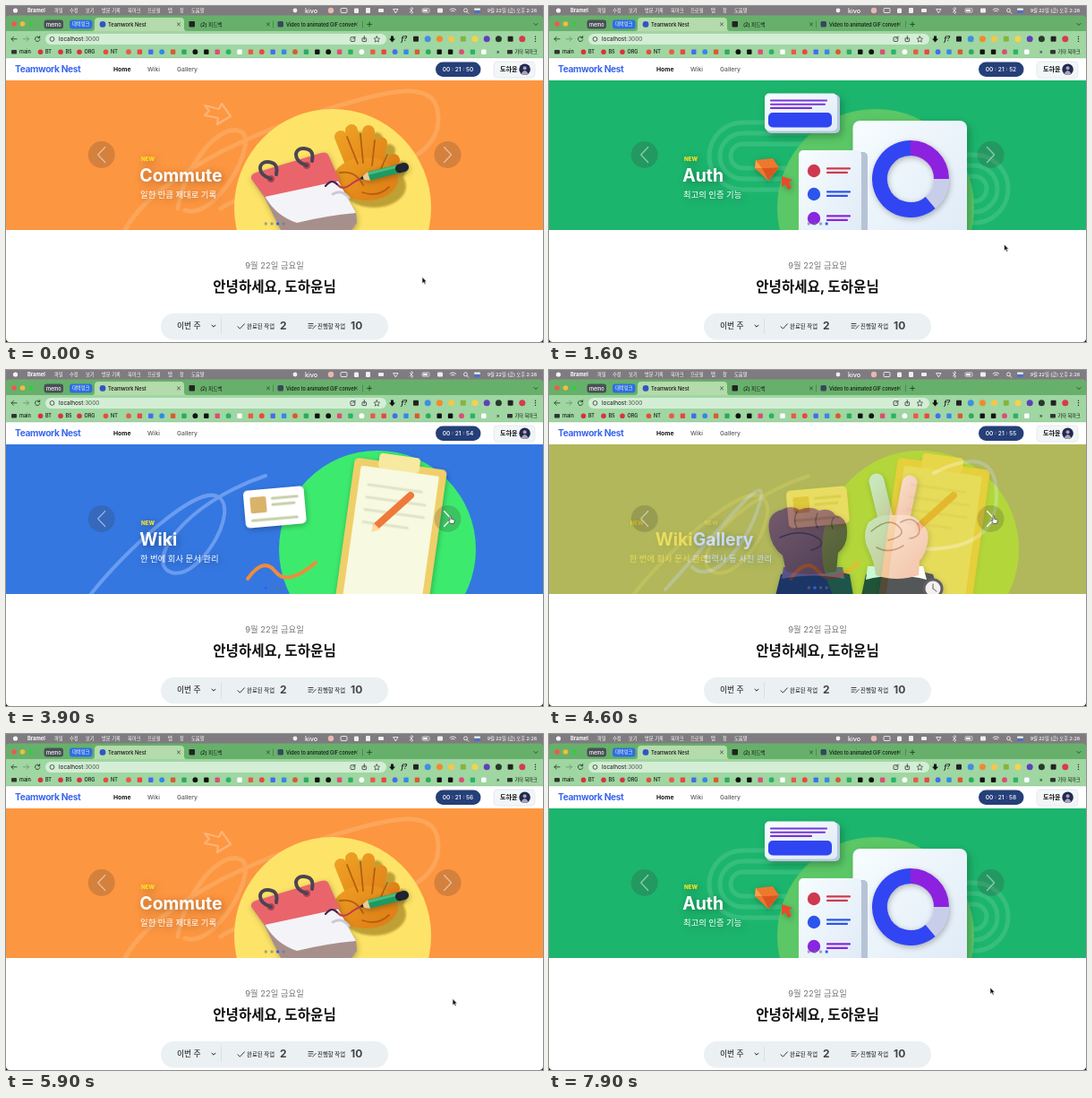
These frames come from a looping animation (600x375 px, 8000 ms). An HTML page:

```html
<!DOCTYPE html>
<html lang="ko">
<head>
<meta charset="utf-8">
<style>
html, body { margin: 0; width: 100%; height: 100%; overflow: hidden; background: #222; }
svg { display: block; width: 100vw; height: 100vh; }
text { font-family: Inter, "Noto Sans CJK KR", "Noto Sans CJK", sans-serif; white-space: pre; }
.near, .far { filter: drop-shadow(2px 2px 4px rgba(0,0,0,.35)); }
.soft { filter: drop-shadow(1px 2px 3px rgba(0,0,0,.28)); }
.deep { filter: drop-shadow(3px 4px 4px rgba(0,40,20,.3)); }
.cast { filter: drop-shadow(9px 8px 1px rgba(150,115,20,.6)); }
</style>
</head>
<body>
<svg id="stage" viewBox="0 0 600 375">
  <defs>
    <clipPath id="banner"><rect y="83" width="600" height="167"/></clipPath>
    <linearGradient id="palm" x1="0" y1="0" x2="1" y2="1">
      <stop stop-color="#eda024"/><stop offset="1" stop-color="#dd7a14"/>
    </linearGradient>
    <linearGradient id="skin" x1="0" y1="0" x2="1" y2="1">
      <stop stop-color="#ffe6d8"/><stop offset="1" stop-color="#f0ad90"/>
    </linearGradient>
    <linearGradient id="dark" x1="0" y1="0" x2="1" y2="1">
      <stop stop-color="#8f5142"/><stop offset="1" stop-color="#54261f"/>
    </linearGradient>
    <linearGradient id="paper" x1="0" y1="0" x2="1" y2="1">
      <stop stop-color="#f7fdff"/><stop offset="1" stop-color="#dfeaf6"/>
    </linearGradient>
  </defs>
  <g id="page"></g>
  <g id="slides" clip-path="url(#banner)"></g>
  <g id="controls"></g>
  <g id="pointer"></g>
</svg>
<script>
const $ = id => document.getElementById(id);
const rect = (x, y, w, h, fill, r = 0, more = '') =>
  `<rect x="${x}" y="${y}" width="${w}" height="${h}" rx="${r}" fill="${fill}" ${more}/>`;
const dot = (x, y, r, fill, more = '') => `<circle cx="${x}" cy="${y}" r="${r}" fill="${fill}" ${more}/>`;
const shape = (d, fill, more = '') => `<path d="${d}" fill="${fill}" ${more}/>`;
const line = (d, color, w = 1, more = '') =>
  `<path d="${d}" fill="none" stroke="${color}" stroke-width="${w}" stroke-linecap="round" stroke-linejoin="round" ${more}/>`;
const label = (x, y, s, size, weight = 400, fill = '#111', more = '') =>
  `<text x="${x}" y="${y}" font-size="${size}" font-weight="${weight}" fill="${fill}" ${more}>${s}</text>`;
const cross = (x, y) => line(`M${x - 1.6} ${y - 1.6}l3.2 3.2m0 -3.2l-3.2 3.2`, '#1d3520', .7);

function menuBar() {
  const items = [[54, '파일'], [71, '수정'], [89, '보기'], [107, '방문 기록'], [136, '북마크'],
    [158, '프로필'], [181, '탭'], [194, '창'], [207, '도움말']];
  let s = rect(0, 0, 600, 16, '#7f7b80') + dot(10.5, 5, 2.6, '#f4f4f4') +
    label(24, 7.2, 'Bramel', 5.8, 700, '#fff');
  for (const [x, t] of items) s += label(x, 7.1, t, 5.3, 500, '#fff');
  s += dot(323, 5, 2.4, '#eee') + label(334, 7.6, 'kivo', 7.2, 500, '#fff') + dot(363, 5, 3.2, '#e8b8b0');
  s += rect(374, 2.5, 7, 5, 'none', 1, 'stroke="#fff" stroke-width=".8"');
  s += rect(389, 2.5, 5, 5.5, '#eee', 1) + rect(402, 2, 5, 6, '#eee', 1) + rect(416, 3, 6, 4, '#eee', 1);
  s += line('M433 3.5h5l-2.5 4z', '#fff', .8) + line('M451 3l4 4l-2 1.5v-7l2 1.5l-4 4', '#fff', .6);
  s += rect(465, 2.8, 8, 4.4, 'none', 1, 'stroke="#eee" stroke-width=".7"') + rect(466, 3.8, 5, 2.4, '#eee');
  s += rect(482, 2.5, 6, 5, '#eee', 1) + line('M496 4.2q3.3 -2.8 6.6 0M497.6 5.8q1.7 -1.3 3.4 0', '#fff', .9);
  s += line('M515 6.5l1.8 1.8', '#fff', .8) + dot(513.5, 4.8, 2, 'none', 'stroke="#fff" stroke-width=".8"');
  s += rect(523, 2.5, 7, 2.3, '#eee', 1.1) + rect(523, 5.5, 7, 2.3, '#3674d8', 1.1);
  return s + label(593, 7.2, '9월 22일 (금) 오후 2:28', 5.3, 500, '#fff', 'text-anchor="end"');
}

function browser() {
  let s = rect(0, 10.5, 600, 30, '#67b06b', 4) + rect(0, 28, 600, 30, '#9fd6a2');
  ['#f0574f', '#f3bd35', '#3cc84a'].forEach((c, i) => s += dot(9 + i * 9.5, 20, 2.8, c));
  s += rect(42.5, 15.5, 21.5, 10, '#494f55', 3) + label(53.3, 22.5, 'memo', 5.6, 500, '#fff', 'text-anchor="middle"');
  s += rect(71, 15.5, 25.5, 10, '#2d6ee0', 3) + label(83.7, 22.4, '대박링크', 5.3, 500, '#fff', 'text-anchor="middle"');
  s += shape('M96 28q3 0 3 -3v-8q0 -4 4 -4h92q4 0 4 4v8q0 3 3 3z', '#b4dbab');
  s += dot(108, 20.4, 3.4, '#3154c8') + label(114, 22.5, 'Teamwork Nest', 5.7, 500);
  s += rect(204.5, 17, 6.5, 6.5, '#222', 1) + label(217, 22.5, '(2) 피드백', 5.6, 500);
  s += rect(303.5, 17, 6.5, 6.5, '#35485c', 1.5) + label(313, 22.5, 'Video to animated GIF conver', 5.5, 500);
  s += cross(193, 20.4) + cross(293, 20.4) + cross(391, 20.4);
  s += line('M298.5 17v7M398.5 17v7', '#407b45', .7) + line('M403.6 20.4h5M406.1 17.9v5', '#173b1b', .8);
  s += line('M590 19.5l2 2l2 -2', '#173b1b', .8);
  // address row
  s += line('M12 36.8h-6m2.4 -2.4l-2.4 2.4l2.4 2.4', '#28422b', .9);
  s += line('M19.5 36.8h6m-2.4 -2.4l2.4 2.4l-2.4 2.4', '#6b9a70', .9);
  s += line('M37.6 35.6a2.7 2.7 0 1 0 .2 2m-.1 -4v2h-2', '#28422b', .9);
  s += rect(44, 31, 381, 12, '#d3eed5', 6) + dot(51.5, 36.9, 2.4, 'none', 'stroke="#333" stroke-width=".8"');
  s += label(59, 39.2, 'localhost<tspan fill="#4b5b4c">:3000</tspan>', 6.4);
  s += rect(385, 34.7, 4.8, 4.8, 'none', .8, 'stroke="#333" stroke-width=".8"') + line('M387.5 37l3 -3', '#333', .8);
  s += rect(398, 35.8, 4.6, 3.8, 'none', .6, 'stroke="#333" stroke-width=".8"') + line('M400.3 37.5v-4', '#333', .8);
  s += line('M414.3 33.8l1 2.1l2.2 .3l-1.6 1.6l.4 2.3l-2 -1.1l-2 1.1l.4 -2.3l-1.6 -1.6l2.2 -.3z', '#333', .7);
  s += shape('M430 33.5h3v3h2l-3.5 4l-3.5 -4h2z', '#111') + label(441.5, 39.4, 'f?', 7, 700, '#222', 'font-style="italic"');
  const add = ['#222', '#3f8fe0', '#f08b2b', '#f1c84b', '#87b340', '#f4d34a', '#6040b8', '#273b29', '#222', '#d83a4e'];
  add.forEach((c, i) => s += i % 4 ? dot(458 + i * 13.2, 36.8, 3.5, c) : rect(455 + i * 13.2, 33.8, 6, 6, c, 1));
  [34.2, 36.8, 39.4].forEach(y => s += dot(591.5, y, .7, '#222'));
  // bookmarks row
  s += rect(6, 49, 6, 4.6, '#333', 1);
  [[15, 'main'], [44, 'BT'], [66.5, 'BS'], [87.5, 'ORG'], [117, 'NT']].forEach(([x, t], i) => {
    s += label(x, 53.3, t, 5.5, 500);
    if (i) s += dot(x - 5.5, 51.2, 2.8, i == 4 ? '#e84b3d' : '#db3040');
  });
  const hues = ['#ea5a45', '#db4d76', '#2daa62', '#446cf0', '#fff', '#111', '#d85b30', '#e44', '#2ab366', '#111', '#3688e8'];
  for (let i = 0; i < 33; i++) {
    const x = 137 + i * 12.4, c = hues[i * 7 % 11];
    s += i % 3 ? rect(x - 2.7, 48.5, 5.4, 5.4, c, 1) : dot(x, 51.2, 2.9, c);
  }
  return s + label(548, 53, '»', 6) + rect(560, 49, 6, 4.6, '#333', 1) + label(568.5, 53.2, '기타 북마크', 5.2, 500);
}

function site() {
  let s = rect(0, 58, 600, 317, '#fff', 0) + rect(0, 57.6, 600, .6, '#8fbb92');
  s += label(10, 74.4, 'Teamwork Nest', 10.2, 700, '#3a66ee', 'letter-spacing="-.35"');
  s += label(120, 73.2, 'Home', 6.8, 700) + label(158, 73.2, 'Wiki', 6.8, 500, '#5b5b5b') + label(191, 73.2, 'Gallery', 6.8, 500, '#5b5b5b');
  s += rect(480, 62.5, 50.5, 16.4, '#253f78', 8.2);
  s += label(505, 73, '', 6.6, 500, '#fff', 'id="clock" text-anchor="middle"');
  s += rect(545, 62, 46, 18, '#f2f6f8', 4, 'stroke="#dfe6ea" stroke-width=".7"') + label(552, 73.4, '도하윤', 7.1, 700);
  s += dot(579.6, 70.8, 6.3, '#222850') + dot(579.6, 69.2, 2, '#a9a4b5') + shape('M575.6 75.4q4 -7 8 0q-4 3 -8 0z', '#a9a4b5');
  s += label(300, 293.4, '9월 22일 금요일', 9.4, 400, '#777', 'text-anchor="middle"');
  s += label(300, 319, '안녕하세요, 도하윤님', 15.6, 700, '#111', 'text-anchor="middle"');
  s += rect(173, 343, 254, 29.5, '#ebf1f3', 14.7) + label(191, 360.4, '이번 주', 8.8, 500);
  s += line('M230 356.2l2 2l2 -2', '#222', 1) + line('M240.5 349v17', '#d3dadd', .7);
  s += line('M259 357.8l2.4 2.4l5 -5.4', '#333', 1) + label(269, 360, '완료된 작업', 6.4, 500) + label(306, 361.4, '2', 12, 700, '#444');
  s += line('M338 354.5h5m-5 2.4h5m-5 2.4h3m1.6 1l3.6 -3.8', '#333', .9) + label(348, 360, '진행할 작업', 6.4, 500) + label(385, 361.4, '10', 12, 700, '#444');
  return s + shape('M0 371v4h4q-4 0 -4 -4zM600 371v4h-4q4 0 4 -4z', '#111');
}

const halo = c => dot(365, 225, 110, c);
const bars = (x, y, w, c) => line(`M${x} ${y}h${w}M${x} ${y + 4.5}h${w - 3}`, c, 2.2);

function wikiArt() {
  let s = dot(415, 200, 110, '#3ceb6e');
  s += line('M95 250C130 205 215 125 238 142S215 235 185 226S195 150 290 118', '#6b9cf0', 4);
  s += `<g class="soft" transform="rotate(8 432 165)">` + rect(381, 104, 104, 170, '#f0cf6a', 5) + rect(389, 112, 88, 160, '#f7fae0', 2) +
    rect(408, 95, 46, 17, '#f7e9a0', 4) + line('M400 132h60m-60 14h66m-66 14h66m-66 14h50', '#dfe4c8', 3) + '</g>';
  s += `<g class="soft" transform="rotate(-5 300 150)">` + rect(266, 132, 68, 42, '#fff', 5) + rect(273, 140, 18, 18, '#d9b36a', 2) +
    line('M298 143h28m-28 7h24m-48 16h50', '#c5cfa8', 3) + '</g>';
  s += line('M270 233q18 -25 31 -8t45 -10', '#ef8b3b', 4) + line('M414 174l38 -34', '#ef793b', 8) + shape('M408 181l3 -10l7 7z', '#ffd9a0');
  return s;
}

function galleryArt() {
  let s = line('M130 245C190 180 250 100 235 150S180 240 160 220M430 115q70 -35 70 25t-80 60', '#ecdf70', 4);
  s += `<g class="soft">` + shape('M253 252l6 -24q38 -9 77 0l4 24z', '#141d3a') + shape('M262 220h66l2 13q-34 -7 -70 0z', '#6a4468');
  s += shape('M246 180q-3 -20 14 -24q10 -6 20 0q12 -5 22 1q12 -4 18 5q14 3 13 20q0 14 -10 22l-2 21q-30 6 -56 0l-4 -18q-13 -10 -15 -27z', 'url(#dark)');
  s += line('M277 158q-5 10 0 18M300 160q-4 9 0 16M318 165q-4 6 -1 12M258 187q24 -11 43 1q10 8 -8 13', '#3d1b18', 1.6) + '</g>';
  s += `<g class="soft">` + shape('M349 252l5 -24q36 -10 75 0l8 24z', '#181a24') + shape('M356 219h62l4 15q-34 -9 -68 0z', '#fff');
  s += line('M366 124l12 50M403 126l-10 48', 'url(#skin)', 17);
  s += shape('M357 170q12 -10 30 -8q22 -3 29 10q10 6 7 21q-3 14 -9 20l-1 16q-25 8 -48 0q-2 -16 -8 -28q-8 -16 0 -31z', 'url(#skin)');
  s += line('M360 180q20 -17 31 -5q10 10 -12 15M393 170q14 -8 20 4q4 12 -10 14M366 198q14 8 30 -2', '#c07f66', 1.6);
  return s + dot(429, 244, 10, '#f4eef4', 'stroke="#2b2540" stroke-width="3"') + line('M429 244v-5m0 5l4 3', '#2b2540', 1) + '</g>';
}

function commuteArt() {
  let s = line('M132 252C150 215 215 165 330 125S482 85 483 125S435 180 400 190M192 226C200 175 240 130 262 140S235 240 200 228M240 226q30 -20 50 -4t-30 14', '#fca65a', 5);
  s += line('M222 111l16 4l3 -6l10 14l-15 9l1 -7l-15 -3l5 -5z', '#fdb477', 2.2) + halo('#fde468');
  // open hand: four fingers fanned over a palm
  s += `<g class="cast">` + line('M374 146L390 186M386 139L397 184M405 140L405 184M419 153L412 188M433 172L420 196', 'url(#palm)', 14) +
    `<ellipse cx="402" cy="193" rx="36" ry="24" fill="url(#palm)"/></g>`;
  s += line('M381 146l12 30M396 143l3 32M412 150l-3 28M426 166l-9 20M373 186q18 -3 26 14M428 202q-12 12 -30 6', '#b55f12', 1.8);
  s += `<g class="soft">` + shape('M274 192l15 22l20 40h74l9 -12l-1 -11l-20 -34z', '#a78f8c') + shape('M289 212l82 -17l20 36q-34 3 -66 11q-24 -8 -36 -30z', '#f4f3f8');
  s += shape('M274 193q-1 -5 5 -7l73 -22q7 -2 9 4l12 27l-84 18z', '#e9656b') + '</g>';
  [[293, 185], [333, 170]].forEach(([x, y]) => s += dot(x + 3, y + 8, 4, '#b0444f') +
    line(`M${x + 3} ${y + 8}C${x - 14} ${y + 2} ${x - 11} ${y - 12} ${x} ${y - 11}S${x + 10} ${y - 2} ${x + 9} ${y + 3}`, '#4d4452', 4));
  s += line('M357 201q7 -9 13 -2t14 1t14 -8', '#c23b4c', 2) + line('M357 201q7 -9 13 -2', '#3b2858', 2) + line('M365 210q10 -6 18 4', '#c9c8d8', 3);
  s += `<g class="soft">` + line('M405 190l36 -9', '#1f9962', 10, 'style="stroke-linecap:butt"') + line('M405 187l36 -9', '#46bd7e', 3) +
    line('M440 181.3l5 -1.4', '#1f2431', 10) + shape('M395 193l9 -8l3 10z', '#ebc995') + shape('M395 193l3.5 -3.5l1.2 4.4z', '#222') + '</g>';
  return s;
}

function authArt() {
  let s = halo('#5bc766');
  const ring = (x, y, w, h) => rect(x, y, w, h, 'none', h / 2, 'stroke="#3fc284" stroke-width="5" opacity=".75"');
  for (let i = 0; i < 3; i++) {
    const d = i * 12;
    s = ring(179 + d, 130 + d, 190 - 2 * d, 75 - 2 * d) + ring(375 + d, 166 + d, 138 - 2 * d, 76 - 2 * d) + s;
  }
  s += `<g class="deep">` + rect(243, 99, 82, 43, '#b6c7dc', 5) + rect(241, 97.5, 81, 42, 'url(#paper)', 5) +
    line('M248 105.5h62m-62 4.2h60m-60 4.2h45', '#7a35d8', 2.1) + rect(245, 119, 71, 16.5, '#2f45f2', 5) + '</g>';
  s += `<g class="deep">` + rect(339.5, 128, 127.5, 135, 'url(#paper)', 8) + '</g>';
  // donut: start and end in degrees clockwise from the top
  const arc = (a, b, c) => {
    const at = g => [404 + 34.5 * Math.sin(g * Math.PI / 180), 193 - 34.5 * Math.cos(g * Math.PI / 180)].join(' ');
    return line(`M${at(a)}A34.5 34.5 0 ${b - a > 180 ? 1 : 0} 1 ${at(b)}`, c, 17, 'style="stroke-linecap:butt"');
  };
  s += `<g class="soft">` + arc(90, 142, '#c8cee9') + arc(140, 361, '#3245f3') + arc(0, 90, '#8c22df') + '</g>';
  s += rect(284, 163, 72, 100, '#b5c3d5', 5) + rect(279, 161, 70, 100, 'url(#paper)', 5);
  [['#cf3950', 184], ['#2c55ed', 210], ['#8926df', 237]].forEach(([c, y]) => s += dot(296, y, 7.2, c) + bars(311, y - 2.6, 25, c));
  s += `<g class="soft">` + shape('M231 172l19 -2l7 10l-12 15l-15 -14z', '#ed782e') + shape('M231 172l7 9l19 -1l-12 15l-7 -14l-8 0z', '#f6a04e') + shape('M238 181l19 -1l-12 15z', '#d9571f');
  return s + shape('M260 190l12 4l-4 3l3 6l-4 2l-3 -6l-4 3z', '#e84a2b') + '</g>';
}

const slides = [
  ['Wiki', '한 번에 회사 문서 관리', '#3477e1', wikiArt],
  ['Gallery', '협력사 등 사진 관리', '#e1d028', galleryArt],
  ['Commute', '일한 만큼 제대로 기록', '#fd9640', commuteArt],
  ['Auth', '최고의 인증 기능', '#1cb56d', authArt]
];

$('page').innerHTML = menuBar() + browser() + site();
$('slides').innerHTML = slides.map(([title, sub, bg, art]) => `<g>${rect(0, 83, 600, 167, bg)}${art()}
  <g class="far">${label(151, 173.2, 'NEW', 6.2, 800, '#ffe21f')}</g>
  <g class="near">${label(149.3, 196, title, 19.4, 700, '#fff')}</g>
  <g class="far">${label(150, 214.2, sub, 9.4, 500, '#fff')}</g></g>`).join('');
const cards = [...$('slides').children];

const arrow = (x, dir) => `<g>${dot(x, 166, 15, 'rgba(60,50,50,.21)')}${line(`M${x - 4 * dir} 157.5l${8 * dir} 8.5l${-8 * dir} 8.5`, '#fff', 1.2, 'opacity=".5"')}</g>`;
$('controls').innerHTML = arrow(106.7, -1) + arrow(493.5, 1) + [290.3, 297, 303.6, 310.2].map(x => dot(x, 243, 1.7, '#777', 'class="bullet"')).join('');
const bullets = [...document.querySelectorAll('.bullet')];
const nextMark = $('controls').children[1].lastChild;

$('pointer').innerHTML =
  shape('M0 0v7.2l1.7 -1.5l1.2 2.6l1.3 -.6l-1.2 -2.5h2.2z', '#111', 'stroke="#fff" stroke-width=".6"') +
  shape('M0 0q1 -1 1.4 .2v3l3 .8q1 .4 .7 1.7l-.7 2.8h-3.6l-2.5 -3.2q.2 -1 1.7 0z', '#fff', 'stroke="#222" stroke-width=".6"');
const [tip, hand] = $('pointer').children;

const LOOP = 8000, STEP = 100, FADE = 300;
// time of each click and the slide it leads to
const changes = [[-1000, 2], [900, 3], [3290, 0], [4470, 1], [5400, 2], [7000, 3]];
const path = [[0, 465, 302.5], [700, 495, 165], [1050, 495, 165], [1600, 508.5, 266], [2400, 508.5, 266], [3000, 496, 163],
  [5480, 496, 163], [5900, 499, 295.5], [6300, 499, 295.5], [6850, 494, 169], [7200, 494, 169], [7750, 493, 283]];

// cubic-bezier(.25, .1, .25, 1)
function ease(x) {
  if (x <= 0 || x >= 1) return x <= 0 ? 0 : 1;
  const curve = (s, a, b) => 3 * (1 - s) ** 2 * s * a + 3 * (1 - s) * s * s * b + s ** 3;
  let lo = 0, hi = 1;
  for (let i = 0; i < 20; i++) {
    const mid = (lo + hi) / 2;
    if (curve(mid, .25, .25) < x) lo = mid; else hi = mid;
  }
  return curve(lo, .1, 1);
}

function place(card, amount) {
  card.querySelectorAll('.near').forEach(g => g.setAttribute('transform', `translate(${42 * amount})`));
  card.querySelectorAll('.far').forEach(g => g.setAttribute('transform', `translate(${83 * amount})`));
}

function pointerAt(t) {
  const i = path.findIndex(k => k[0] > t);
  if (i < 0) return path[path.length - 1].slice(1);
  const [a, b] = [path[i - 1], path[i]], u = (t - a[0]) / (b[0] - a[0]), k = u * u * (3 - 2 * u);
  return [a[1] + (b[1] - a[1]) * k, a[2] + (b[2] - a[2]) * k];
}

function draw(t) {
  const [start, now] = changes.filter(c => c[0] <= t).pop();
  const p = ease((t - start) / FADE), before = (now + 3) % 4;
  cards.forEach((c, i) => c.style.display = i == now || (i == before && p < 1) ? '' : 'none');
  if ($('slides').lastChild != cards[now]) $('slides').append(cards[now]);
  cards[now].style.opacity = p;
  cards[before].style.opacity = 1;
  place(cards[now], 1 - p);
  place(cards[before], -p);
  bullets.forEach((b, i) => {
    b.setAttribute('fill', i == now ? '#2f62f0' : '#6b7280');
    b.setAttribute('opacity', i == now ? 1 : .6);
  });
  $('clock').textContent = '00 : 21 : ' + Math.floor(50.55 + t / 1000);
  const [x, y] = pointerAt(t), over = Math.hypot(x - 493.5, y - 166) < 15;
  $('pointer').setAttribute('transform', `translate(${x} ${y})`);
  tip.style.display = over ? 'none' : '';
  hand.style.display = over ? '' : 'none';
  nextMark.setAttribute('opacity', over ? 1 : .5);
}

const origin = performance.now();
function tick() {
  const t = (performance.now() - origin) % LOOP;
  draw(Math.floor(t / STEP) * STEP);
  requestAnimationFrame(tick);
}
tick();
</script>
</body>
</html>
```
